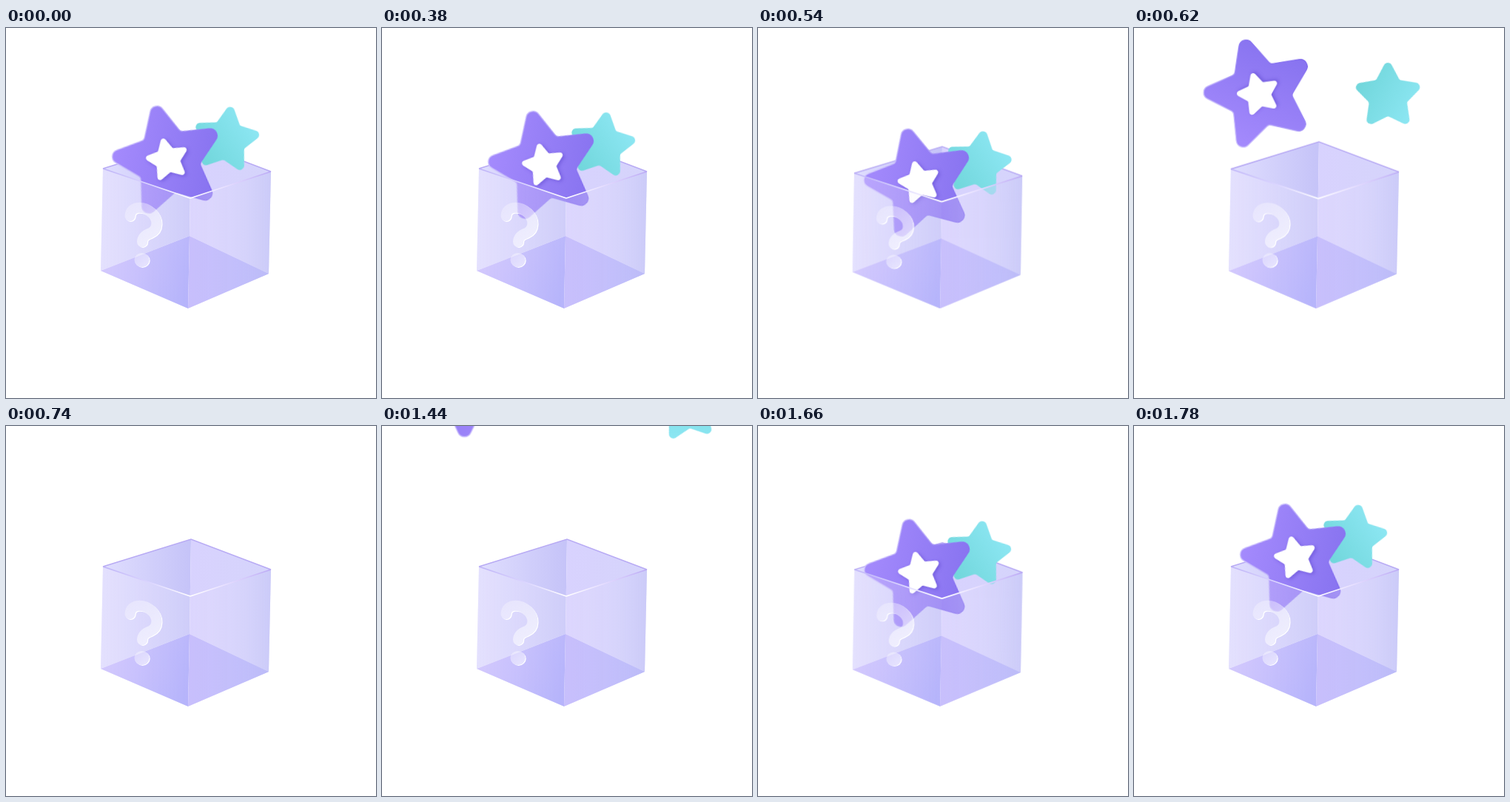
An HTML page for the animation above (1.8 s loop, 500x500 px).

```html
<!DOCTYPE html>
<html lang="en">
<head>
<meta charset="utf-8">
<title>Mystery box</title>
<style>
  html, body { margin: 0; width: 100%; height: 100%; overflow: hidden; background: #fff; }
  svg { display: block; width: 100%; height: 100%; }
  .box { transform-origin: 246px 379px; }
</style>
</head>
<body>
<svg viewBox="0 0 500 500">
  <defs>
    <linearGradient id="backLeft" gradientUnits="userSpaceOnUse" x1="129" y1="0" x2="250" y2="0">
      <stop stop-color="#e0defe"/><stop offset="1" stop-color="#c5c3f8"/>
    </linearGradient>
    <linearGradient id="backRight" gradientUnits="userSpaceOnUse" x1="249" y1="0" x2="358" y2="0">
      <stop stop-color="#d8d2fe"/><stop offset="1" stop-color="#d5d4fb"/>
    </linearGradient>
    <linearGradient id="floorLeft" gradientUnits="userSpaceOnUse" x1="140" y1="310" x2="248" y2="345">
      <stop stop-color="#c6bbfd"/><stop offset="1" stop-color="#a6a4fa"/>
    </linearGradient>
    <linearGradient id="floorRight" gradientUnits="userSpaceOnUse" x1="247" y1="0" x2="355" y2="0">
      <stop stop-color="#bfb6fc"/><stop offset="1" stop-color="#a9a8fa"/>
    </linearGradient>
    <linearGradient id="glassLeft" gradientUnits="userSpaceOnUse" x1="129" y1="0" x2="249" y2="0">
      <stop stop-color="#ede6ff" stop-opacity=".3"/><stop offset="1" stop-color="#f6f4ff" stop-opacity=".2"/>
    </linearGradient>
    <linearGradient id="glassRight" gradientUnits="userSpaceOnUse" x1="248" y1="0" x2="358" y2="0">
      <stop stop-color="#f0e8ff" stop-opacity=".18"/><stop offset=".65" stop-color="#d6d4fb" stop-opacity=".45"/>
      <stop offset="1" stop-color="#c5c5f6" stop-opacity=".65"/>
    </linearGradient>
    <linearGradient id="rimLeft" gradientUnits="userSpaceOnUse" x1="131" y1="0" x2="249" y2="0">
      <stop stop-color="#bdb2f7"/><stop offset=".55" stop-color="#dcd6ff"/><stop offset="1" stop-color="#fff"/>
    </linearGradient>
    <linearGradient id="rimRight" gradientUnits="userSpaceOnUse" x1="249" y1="0" x2="358" y2="0">
      <stop stop-color="#fff"/><stop offset=".45" stop-color="#e6deff"/><stop offset="1" stop-color="#bba9f5"/>
    </linearGradient>
    <linearGradient id="purple" x1="0" y1=".3" x2="1" y2=".7">
      <stop stop-color="#a58bfd"/><stop offset="1" stop-color="#8672ef"/>
    </linearGradient>
    <linearGradient id="edge" x1="0" y1=".1" x2="1" y2=".9">
      <stop stop-color="#ddd5ff"/><stop offset=".4" stop-color="#b9aafa"/>
      <stop offset=".65" stop-color="#8f7bf4"/><stop offset="1" stop-color="#7a62ec"/>
    </linearGradient>
    <linearGradient id="teal" x1=".9" y1=".1" x2=".1" y2=".8">
      <stop stop-color="#8fe8f5"/><stop offset="1" stop-color="#72d7dc"/>
    </linearGradient>
    <linearGradient id="frost" x1="0" y1="0" x2="1" y2="1">
      <stop stop-color="#fff" stop-opacity=".3"/><stop offset="1" stop-color="#fff" stop-opacity=".6"/>
    </linearGradient>
    <filter id="shade" x="-30%" y="-30%" width="160%" height="160%">
      <feGaussianBlur stdDeviation="2.5"/>
    </filter>
    <g id="mark">
      <path d="M167.5 254C168 240 186 240 196 249C206 258 206 272 195 277C187 280 184 283 184 289" fill="none" stroke-width="14" stroke-linecap="round"/>
      <ellipse cx="183.5" cy="313.5" rx="10" ry="9.5" stroke="none"/>
    </g>
    <mask id="outside" maskUnits="userSpaceOnUse" x="140" y="220" width="90" height="120">
      <rect x="140" y="220" width="90" height="120" fill="#fff"/>
      <use href="#mark" fill="#000" stroke="#000"/>
    </mask>
  </defs>

  <g class="box">
    <path d="M131 190L250 153L248 281L128 328Z" fill="url(#backLeft)"/>
    <path d="M250 153L358 194L355 332L248 281Z" fill="url(#backRight)"/>
    <path d="M128 328L248 281L246 379Z" fill="url(#floorLeft)"/>
    <path d="M248 281L355 332L246 379Z" fill="url(#floorRight)"/>
    <path d="M131 190L250 153L358 194" fill="none" stroke="#b8abf4" stroke-width="1.6"/>
  </g>

  <g id="tealStar"><path id="tealShape" fill="url(#teal)"/></g>

  <g id="purpleStar">
    <path id="purpleShape" fill="url(#purple)" stroke="url(#edge)" stroke-width="1.4"/>
    <g transform="translate(-.2 -1.6)">
      <path class="core" transform="translate(2 2)" fill="#5f48d0" opacity=".6" filter="url(#shade)"/>
      <path class="core" fill="#fff"/>
    </g>
  </g>

  <g class="box">
    <path d="M131 190L249 230L246 379L128 328Z" fill="url(#glassLeft)"/>
    <path d="M249 230L358 194L355 332L246 379Z" fill="url(#glassRight)"/>
    <path d="M131 190L249 230" stroke="url(#rimLeft)" stroke-width="1.8"/>
    <path d="M249 230L358 194" stroke="url(#rimRight)" stroke-width="1.8"/>
    <use href="#mark" fill="url(#frost)" stroke="url(#frost)"/>
    <g mask="url(#outside)"><use href="#mark" x="1.2" y=".9" fill="#fff" stroke="#fff"/></g>
  </g>
</svg>
<script>
const LOOP = 1800;
const $ = id => document.getElementById(id);

// Five-pointed star with circular tips and softened notches.
function starPath(outer, inner, tip, notch) {
  const pts = Array.from({ length: 10 }, (_, i) => {
    const a = (i * 36 - 90) * Math.PI / 180, r = i % 2 ? inner : outer;
    return [r * Math.cos(a), r * Math.sin(a)];
  });
  const toward = (p, q) => {
    const x = q[0] - p[0], y = q[1] - p[1], len = Math.hypot(x, y);
    return [x / len, y / len];
  };
  return pts.map((p, i) => {
    const a = toward(p, pts[(i + 9) % 10]), b = toward(p, pts[(i + 1) % 10]);
    const radius = i % 2 ? notch : tip;
    const cut = radius / Math.tan(Math.acos(a[0] * b[0] + a[1] * b[1]) / 2);
    const at = d => `${(p[0] + d[0] * cut).toFixed(2)} ${(p[1] + d[1] * cut).toFixed(2)}`;
    return `${i ? 'L' : 'M'}${at(a)}A${radius} ${radius} 0 0 ${i % 2 ? 0 : 1} ${at(b)}`;
  }).join('') + 'Z';
}

$('purpleShape').setAttribute('d', starPath(88.5, 43, 9.5, 6));
$('tealShape').setAttribute('d', starPath(52, 27, 6, 4));
document.querySelectorAll('.core').forEach(el =>
  el.setAttribute('d', starPath(34, 17.2, 3.7, 2)));

const SLOW_DOWN = 'cubic-bezier(.333,.667,.667,1)';
const SMOOTH = 'cubic-bezier(.3,0,.5,1)';

function play(el, steps) {
  const frames = steps.map(([time, style, easing = 'linear']) =>
    ({ offset: time / LOOP, easing, ...style }));
  el.animate(frames, { duration: LOOP, iterations: Infinity });
}

// Poses are [x, y, degrees].
function animateStar(el, rest, sunk, near, far) {
  const pose = ([x, y, turn], opacity = 1) =>
    ({ transform: `translate(${x}px, ${y}px) rotate(${turn}deg)`, opacity });
  play(el, [
    [0, pose(rest)],
    [360, pose(rest), SLOW_DOWN],
    [540, pose(sunk)],
    [585, pose(near)],
    [720, pose(far)],
    [739, pose(far), 'steps(1, end)'],
    [739, pose(far, 0)],
    [1439, pose(far, 0)],
    [1439, pose(far)],
    [1440, pose(far)],
    [1560, pose(near)],
    [1600, pose(sunk), SMOOTH],
    [1780, pose(rest)],
    [1800, pose(rest)]
  ]);
}

animateStar($('purpleStar'), [219, 179.6, -13], [219.2, 211.8, -13], [191, 144.6, -55], [112, -63, -180]);
animateStar($('tealStar'), [297.5, 151.3, 8], [297.5, 185.3, 8], [317.8, 134.7, 48], [413, -25, 137]);

const upright = { transform: 'skewX(0deg) scaleY(1)' };
const squashed = { transform: 'skewX(.3deg) scaleY(.967)' };
document.querySelectorAll('.box').forEach(el => play(el, [
  [0, upright],
  [380, upright, SMOOTH],
  [540, squashed],
  [630, upright],
  [1520, upright],
  [1600, squashed, SMOOTH],
  [1780, upright],
  [1800, upright]
]));
</script>
</body>
</html>
```
